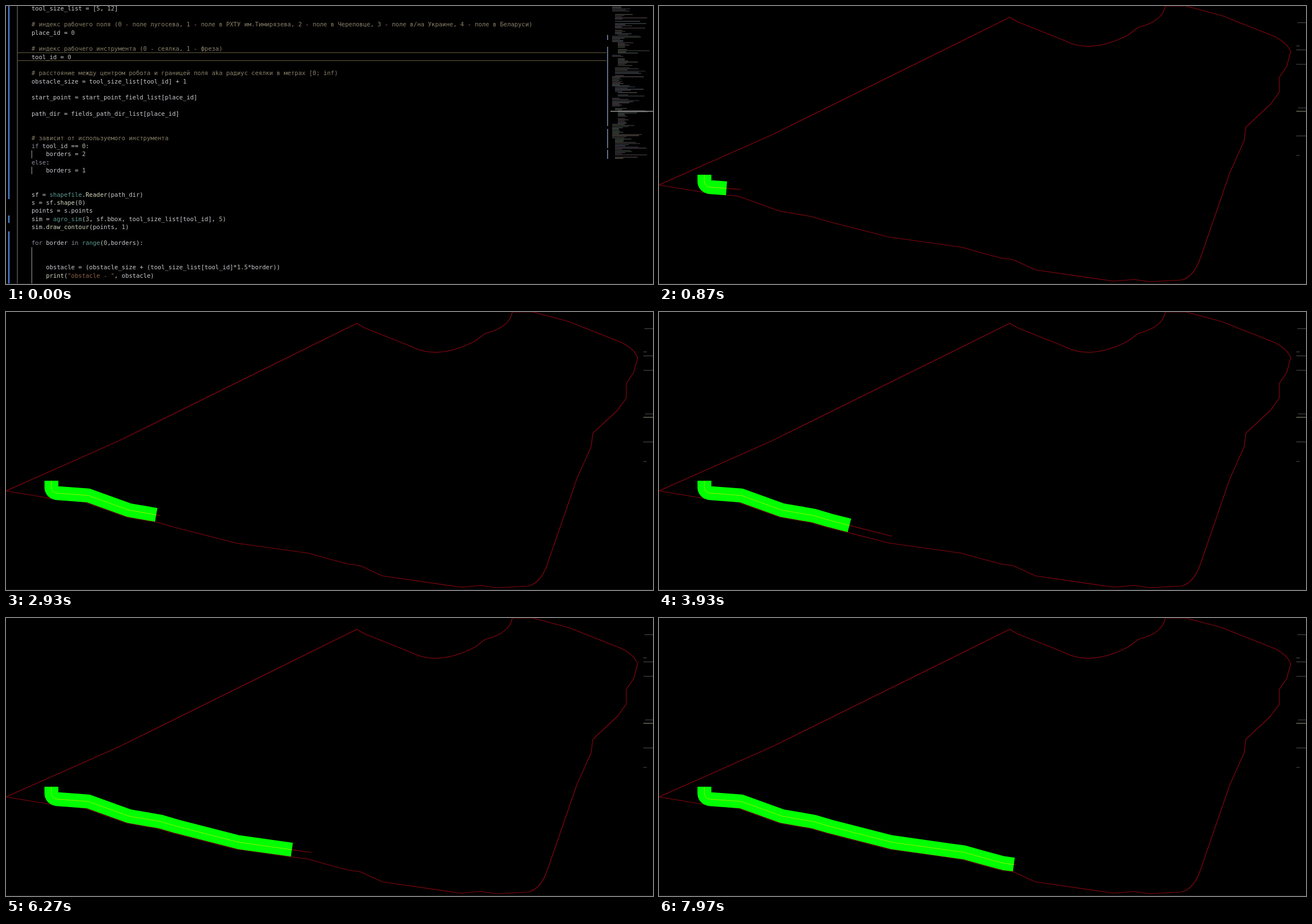
An HTML page that plays this animation: 1140 px wide and 491 px high, repeating every 8 s.

```html
<!DOCTYPE html>
<html lang="ru">
<head>
<meta charset="utf-8">
<title>Field path</title>
<style>
  html, body { margin: 0; width: 100%; height: 100%; overflow: hidden; background: #000; }
  #stage { position: relative; width: 1140px; height: 491px; overflow: hidden; background: #000; }
  svg { position: absolute; left: 0; top: 0; fill: none; }
  pre {
    position: absolute; left: 45px; top: -3.15px; margin: 0;
    font: 10.56px/14.3px "DejaVu Sans Mono", monospace; color: #cacad0;
  }
  pre div { height: 14.3px; }
  .note { color: #8a806a; }
  .key { color: #918b9c; }
  .type { color: #5c9a90; }
  .call { color: #d6d6c0; }
  .num { color: #b4bcaa; }
  .str { color: #8f6248; }
</style>
</head>
<body>
<div id="stage">
  <div id="editor">
    <svg width="1140" height="491">
      <path d="M5 0V341M5 370V383M5 398V491" stroke="#4a80d0" stroke-width="2.5"/>
      <path d="M20 0V491" stroke="#808080"/>
      <path d="M20 82.5H1058M20 96.5H1058" stroke="#625a3c"/>
      <path d="M45.5 255V269M45.5 284V297M45.5 426V491" stroke="#a0a0a0"/>
      <path d="M1060 51V60M1060 72V212M1060 217V251M1060 254V270" stroke="#626c88" stroke-width="2"/>
      <g id="minimap"></g>
      <path d="M1065 186H1140" stroke="#999" stroke-width="1.5"/>
    </svg>
    <pre id="code"></pre>
  </div>
  <svg id="field" width="1140" height="491">
    <path id="border" stroke="#860610" stroke-width="1.2"/>
    <polyline id="ahead" stroke="#860610" stroke-width="1.2"/>
    <polyline id="band" stroke="#0f0" stroke-width="24.5" stroke-linejoin="round"/>
    <polyline id="trail" stroke="#b4ee00" stroke-opacity=".8"/>
    <path stroke="#505050" d="M1125 29.5h15M1123 70.5h6M1123 77.5h17M1123 103h17M1126 180h14M1123 229.5h17M1123 264h6"/>
    <path stroke="#a09c80" d="M1123 186h17"/>
  </svg>
  <svg width="1140" height="491"><path d="M0 490.5H1140" stroke="#181818"/></svg>
</div>
<script>
const LOOP = 8000, START = 100, SPEED = .0733; // ms, ms, px per ms
const $ = id => document.getElementById(id);

const source = `tool_size_list = [5, 12]

# индекс рабочего поля (0 - поле лугосева, 1 - поле в РХТУ им.Тимирязева, 2 - поле в Череповце, 3 - поле в/на Украине, 4 - поле в Беларуси)
place_id = 0

# индекс рабочего инструмента (0 - сеялка, 1 - фреза)
tool_id = 0

# расстояние между центром робота и границей поля aka радиус сеялки в метрах [0; inf)
obstacle_size = tool_size_list[tool_id] + 1

start_point = start_point_field_list[place_id]

path_dir = fields_path_dir_list[place_id]


# зависит от используемого инструмента
if tool_id == 0:
    borders = 2
else:
    borders = 1


sf = shapefile.Reader(path_dir)
s = sf.shape(0)
points = s.points
sim = agro_sim(3, sf.bbox, tool_size_list[tool_id], 5)
sim.draw_contour(points, 1)

for border in range(0,borders):


    obstacle = (obstacle_size + (tool_size_list[tool_id]*1.5*border))
    print("obstacle - ", obstacle)`;

const token = /(?<note>#.*)|(?<str>".*?")|\b(?:(?<key>if|else|for|in)|(?<type>shapefile|agro_sim|range)|(?<call>Reader|shape|draw_contour|print)|(?<num>\d[\d.]*))\b/g;

function paint(line) {
  return line.replace(token, (text, ...rest) => {
    const groups = rest.at(-1);
    const kind = Object.keys(groups).find(name => groups[name] !== undefined);
    return `<span class="${kind}">${text}</span>`;
  });
}

$('code').innerHTML = source.split('\n').map(line => `<div>${paint(line)}</div>`).join('');

function random(seed) {
  return () => (seed = (seed * 16807) % 2147483647) / 2147483647;
}

function minimap() {
  const rnd = random(77);
  let out = '', indent = 0;
  for (let y = 1; y < 270; y += 2) {
    if (rnd() < .2) indent = Math.floor(rnd() * 3) * 5;
    if (rnd() < .12) continue;
    const width = 12 + rnd() ** 2 * 45;
    const light = 24 + rnd() * 18;
    out += `<path d="M${1068 + indent} ${y}h${width}" stroke="hsl(${rnd() * 360} 8% ${light}%)"/>`;
  }
  return out;
}

$('minimap').innerHTML = minimap();

// The robot drives along the lower shore, shifted into the field.
const shore = [
  [140, 336], [212, 362], [267, 371.5], [296, 380], [405, 408],
  [533, 426], [565, 435], [602, 445], [624, 448]
];

$('border').setAttribute('d', `M0 316 78 329 ${shore.join(' ')} 663 466 801 486 837 483
  865 487 920 484Q943 479 955 442L1006 294 1031 238 1034 214 1077 174 1093 152V126
  L1106 107 1113 81Q1108 66 1085 54L992 17 928 0H892Q888 27 844 38L827 51
  Q760 86 712 60L632 28 618 20 200 227Z`);

const route = [[80, 298]];
for (let i = 0; i <= 6; i++) {
  const turn = i / 6 * Math.PI / 2;
  route.push([91 - 11 * Math.cos(turn), 310 + 10 * Math.sin(turn)]);
}
route.push(...shore.map(([x, y]) => [x + 5, y - 12]));

const mix = (a, b, k) => a + (b - a) * k;

function splitRoute(distance) {
  for (let i = 1; i < route.length; i++) {
    const [x0, y0] = route[i - 1], [x1, y1] = route[i];
    const length = Math.hypot(x1 - x0, y1 - y0);
    if (distance <= length) {
      const k = distance / length;
      const tip = [mix(x0, x1, k), mix(y0, y1, k)];
      return { done: [...route.slice(0, i), tip], next: [tip, route[i]] };
    }
    distance -= length;
  }
  return { done: route, next: [] };
}

const setPoints = (id, points) => $(id).setAttribute('points', points.join(' '));

function draw(now) {
  const t = now % LOOP, open = t >= START;
  $('editor').style.display = open ? 'none' : '';
  $('field').style.display = open ? '' : 'none';
  if (!open) return;
  const { done, next } = splitRoute((t - START) * SPEED);
  setPoints('band', done);
  setPoints('trail', done);
  setPoints('ahead', next);
}

const start = performance.now();
function tick() {
  draw(performance.now() - start);
  requestAnimationFrame(tick);
}
tick();
</script>
</body>
</html>
```
